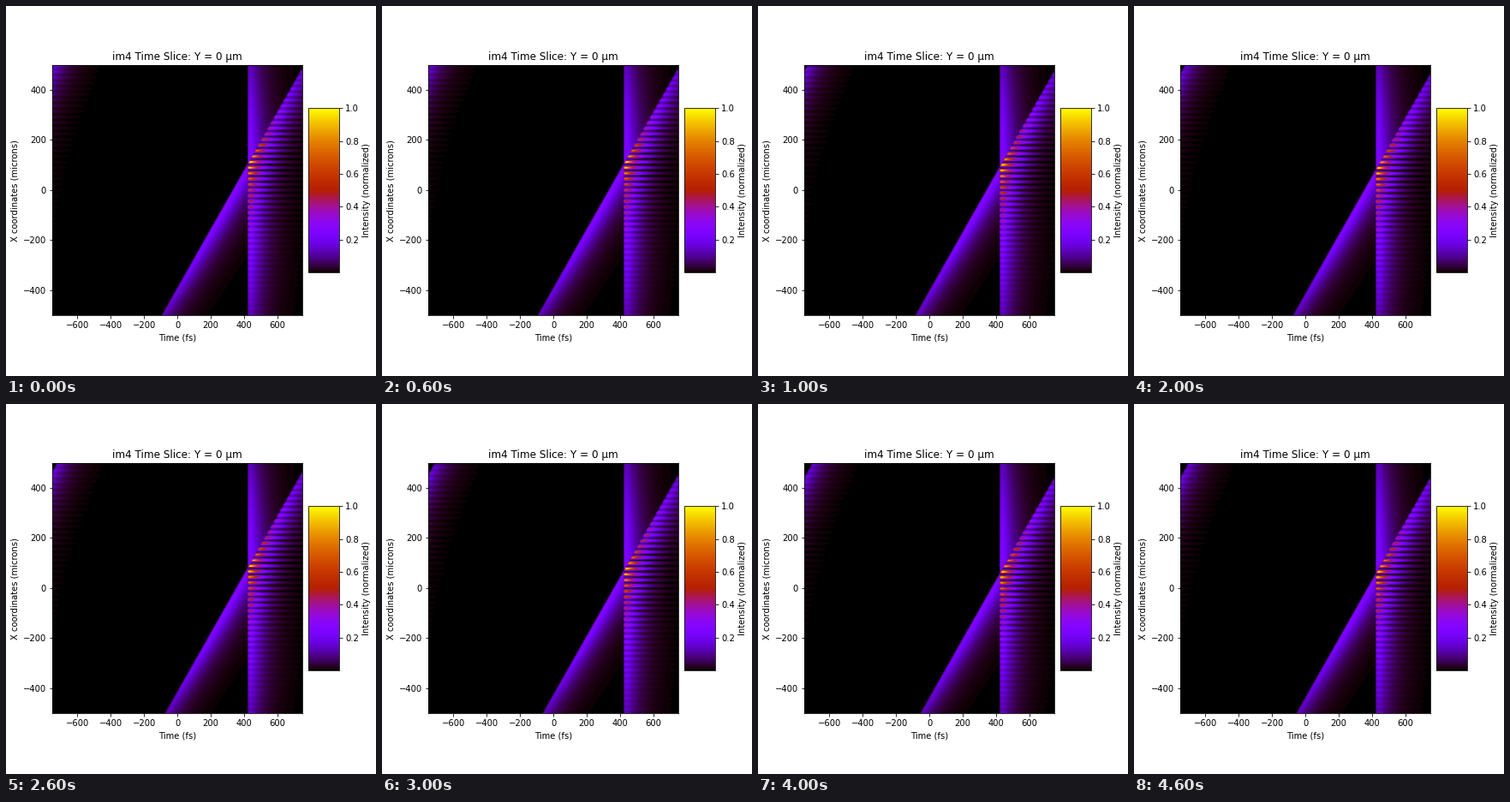
These frames come from a looping animation (432x432 px, 5000 ms). A matplotlib script:

```python
import numpy as np
import matplotlib.pyplot as plt
from matplotlib.animation import FuncAnimation

SIZE, DPI = 432, 72
FRAMES, INTERVAL = 5, 1000

PERIOD = 1500.0    # fs, the time window is cyclic
DECAY = 72.0       # fs, intensity decay of each pulse
RISE = 5.0         # fs, softness of the leading edge
WAIST = 850.0      # microns
TILT = 0.853       # fs per micron
FRINGE = 22.5      # microns
GATE = 420.0       # fs, arrival of the upright pulse
START = 331.5      # fs, arrival of the tilted pulse at x = 0
STEP = 10.0        # fs of extra delay per frame

t = -750 + PERIOD / 512 * np.arange(512)
x = -500 + 1000 / 256 * np.arange(256)
T, X = np.meshgrid(t, x)
profile = 0.5 * np.exp(-(X / WAIST) ** 2)


def pulse(arrival):
    """Amplitude of a pulse with a sharp front and an exponential tail."""
    dt = np.mod(T - arrival, PERIOD)
    return profile * np.exp(-dt / (2 * DECAY)) * (1 - np.exp(-(dt + 2) / RISE))


def intensity(i):
    start = START + STEP * i
    upright, tilted = pulse(GATE), pulse(start + TILT * X)
    cross_x = (GATE - start) / TILT
    phase = 2 * np.pi * (X - cross_x - 7) / FRINGE
    field = upright ** 2 + tilted ** 2 + 2 * upright * tilted * np.cos(phase)
    return field / field.max()


def axes_px(left, bottom, width, height):
    return fig.add_axes([v / SIZE for v in (left, bottom, width, height)])


fig = plt.figure(figsize=(SIZE / DPI, SIZE / DPI), dpi=DPI, facecolor="white")
ax = axes_px(54, 71, 291.8, 291.6)
cax = axes_px(353.2, 121, 35.8, 191.6)

img = ax.imshow(intensity(0), cmap="gnuplot", origin="lower", aspect="auto",
                extent=[t[0], t[-1], x[0], x[-1]], vmin=1e-6, vmax=1)
ax.set_title("im4 Time Slice: Y = 0 µm")
ax.set_xlabel("Time (fs)")
ax.set_ylabel("X coordinates (microns)")
ax.set_xticks(range(-600, 601, 200))
ax.set_yticks(range(-400, 401, 200))

bar = fig.colorbar(img, cax=cax, ticks=[0.2, 0.4, 0.6, 0.8, 1.0])
bar.set_label("Intensity (normalized)")


def update(i):
    img.set_data(intensity(i))
    return [img]


anim = FuncAnimation(fig, update, frames=FRAMES, interval=INTERVAL, repeat=True)
plt.show()
```
